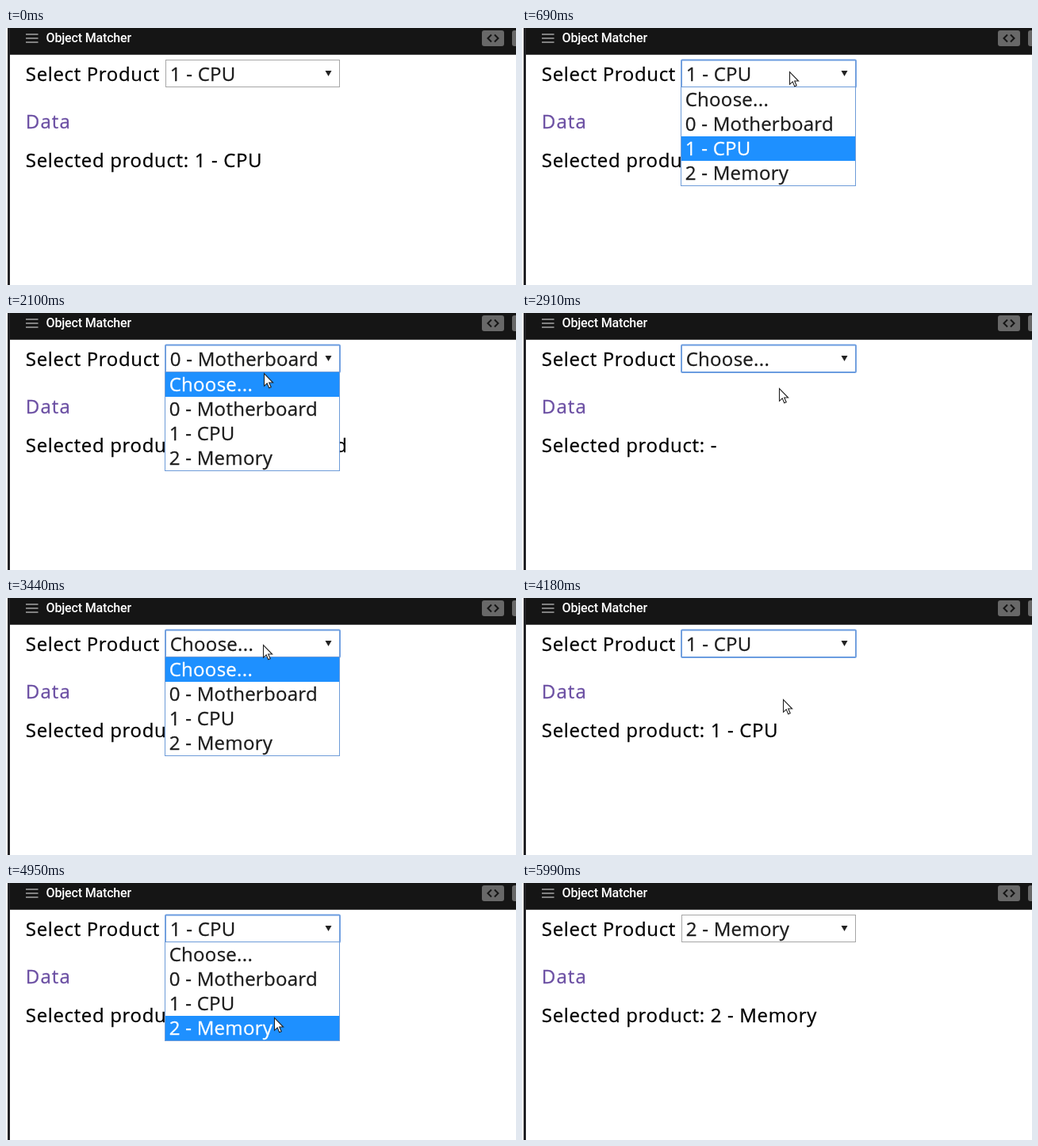
These frames come from a looping animation (643 px wide and 325 px high, 6.09 s). An HTML page:

```html
<!DOCTYPE html>
<html lang="en">
<head>
<meta charset="utf-8">
<title>Object Matcher</title>
<style>
html, body { margin: 0; width: 100%; height: 100%; overflow: hidden; background: #fff; }
svg { display: block; width: 643px; height: 325px; }
text { font: 24px "Open Sans", "Noto Sans", sans-serif; white-space: pre; stroke-width: .3px; }
.label { letter-spacing: .66px; fill: #000; stroke: #000; }
.item { letter-spacing: .27px; fill: #1c1c1c; stroke: #1c1c1c; }
.item.on { fill: #fff; stroke: #fff; }
.data { letter-spacing: 1.1px; fill: #6b4fa3; stroke: #6b4fa3; }
.title { font: 500 16px Roboto, sans-serif; letter-spacing: -.17px; fill: #fff; }
</style>
</head>
<body>
<svg viewBox="0 0 643 325">
  <rect width="643" height="325" fill="#fff"/>
  <rect x="2" width="3" height="325" fill="#222225"/>
  <rect x="5" width="638" height="33.8" fill="#151515"/>
  <path d="M25 8H40.5M25 13H40.5M25 18H40.5" stroke="#eee" stroke-width="1.2"/>
  <text class="title" x="50.5" y="18">Object Matcher</text>
  <g fill="#686868">
    <rect x="600" y="3" width="28" height="20" rx="3"/>
    <rect x="638" y="3" width="28" height="20" rx="3"/>
  </g>
  <path d="M612 8.5L607.5 13L612 17.5M616 8.5L620.5 13L616 17.5" fill="none" stroke="#151515" stroke-width="2"/>

  <text class="label" x="24.8" y="67">Select Product</text>
  <text class="data" x="24.8" y="127">Data</text>
  <text class="label" id="result" x="24.8" y="176"></text>

  <rect x="201.5" y="40.5" width="219" height="34" fill="#fff" stroke="#a6a6a6"/>
  <rect id="ring" x="201" y="40.5" width="220" height="34.5" rx="1" fill="none" stroke="#6a9ce0" stroke-width="1.8"/>
  <text class="item" id="value" x="206.7" y="67"></text>
  <path d="M402.5 54H410.5L406.5 61Z" fill="#222"/>

  <g id="menu">
    <rect x="200.5" y="74.5" width="220" height="125" fill="#fff" stroke="#6d9bd8"/>
    <rect id="bar" x="201" width="219" height="31" fill="#1e90ff"/>
  </g>
  <path id="cursor" d="M.5 .5V16.3L4.2 12.9L6.7 18.8L9.2 17.7L6.7 12H11.6Z" fill="#fff" stroke="#222" stroke-width="1.1"/>
</svg>
<script>
const LOOP = 6090, ROW = 31, MENU_TOP = 75;
const ENTER = 120, FOCUS = 690, BLUR = 5920, LEAVE = 5990;
const options = ["Choose...", "0 - Motherboard", "1 - CPU", "2 - Memory"];
const $ = id => document.getElementById(id);

// Pointer glides: start, end, x, y reached
const glides = [
  [120, 690, 337, 55],
  [850, 1130, 329, 126],
  [1380, 1860, 326, 66],
  [1930, 2100, 325, 76],
  [2170, 2450, 328, 130],
  [2630, 2770, 324, 95],
  [2910, 3190, 324, 54],
  [3370, 3900, 328, 150],
  [4040, 4460, 331, 68],
  [4600, 5020, 339, 178],
  [5220, 5780, 594, 6],
  [5850, 5990, 586, -8]
];

const states = [
  { at: 0, open: false, pick: 2 },
  { at: 690, open: true, pick: 2 },
  { at: 1310, open: true, pick: 1 },
  { at: 1380, open: false, pick: 1 },
  { at: 1860, open: true, pick: 1 },
  { at: 2910, open: false, pick: 0 },
  { at: 3190, open: true, pick: 0 },
  { at: 3970, open: false, pick: 2 },
  { at: 4460, open: true, pick: 2 },
  { at: 5220, open: false, pick: 3 }
];

const ease = k => k * k * (3 - 2 * k);
const show = (el, on) => el.setAttribute("visibility", on ? "visible" : "hidden");

function pointer(t) {
  let x = 551, y = 0;
  for (const [from, to, toX, toY] of glides) {
    if (t < from) break;
    const k = ease(Math.min(1, (t - from) / (to - from)));
    x += (toX - x) * k;
    y += (toY - y) * k;
  }
  return [Math.round(x), Math.round(y)];
}

const rows = options.map((label, i) => {
  const row = $("value").cloneNode();
  row.removeAttribute("id");
  row.setAttribute("x", 205.7);
  row.setAttribute("y", 99 + i * ROW);
  row.textContent = label;
  $("menu").append(row);
  return row;
});

function draw(t) {
  const { open, pick } = states.filter(s => s.at <= t).pop();
  const [x, y] = pointer(t);
  const hot = y < MENU_TOP ? pick : Math.min(3, Math.floor((y - MENU_TOP) / ROW));

  $("result").textContent = "Selected product: " + (pick ? options[pick] : "-");
  $("value").textContent = options[pick];
  show($("ring"), t >= FOCUS && t < BLUR);

  show($("menu"), open);
  $("bar").setAttribute("y", MENU_TOP + hot * ROW);
  rows.forEach((row, i) => row.classList.toggle("on", i === hot));

  show($("cursor"), t >= ENTER && t < LEAVE);
  $("cursor").setAttribute("transform", `translate(${x} ${y})`);
}

const start = performance.now();
function tick() {
  draw((performance.now() - start) % LOOP);
  requestAnimationFrame(tick);
}
tick();
</script>
</body>
</html>
```
